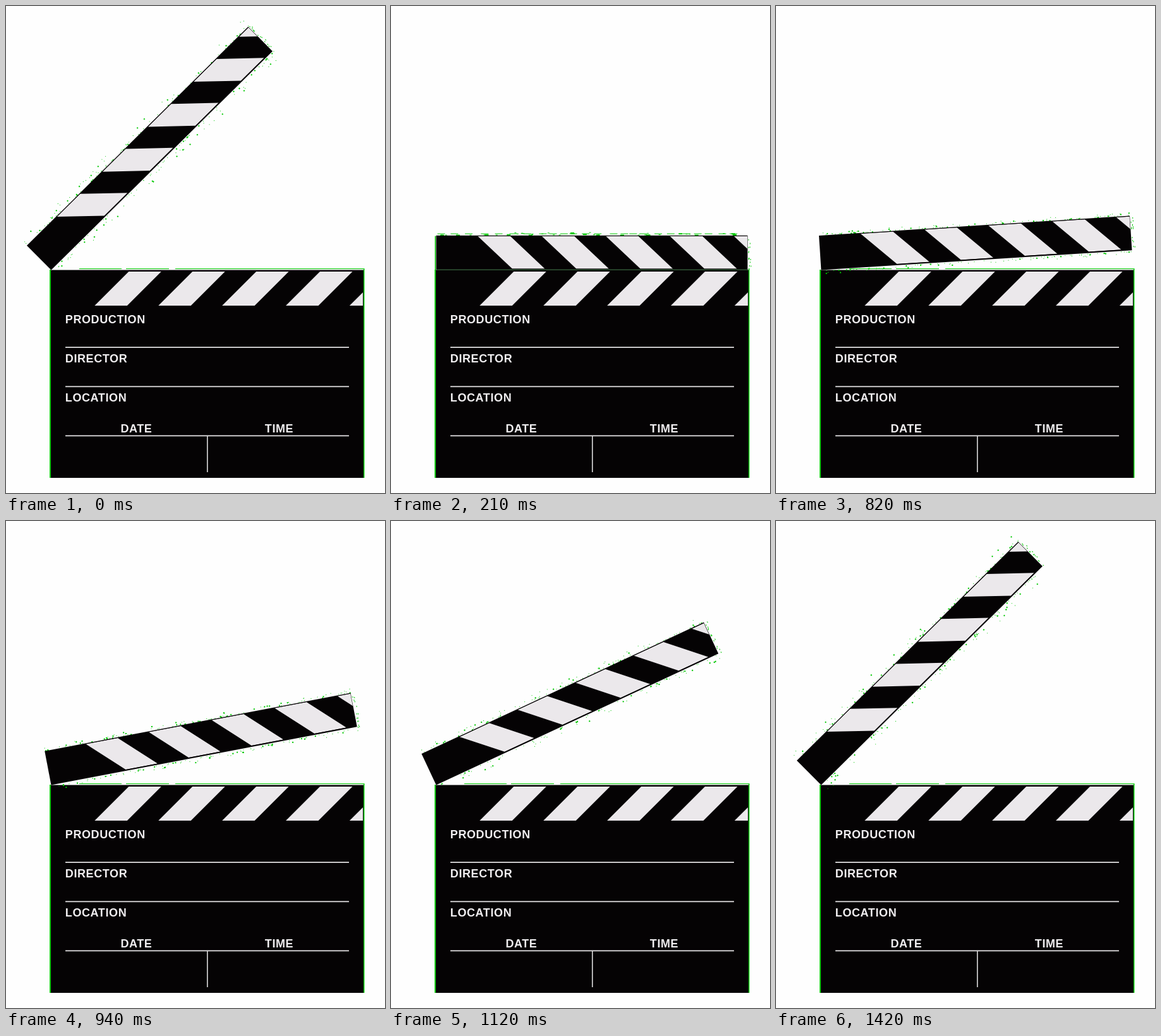
Recreate the animation shown at these times as an HTML page with a canvas. Size 600x772 px, loop 1450 ms.

```html
<!DOCTYPE html>
<html>
<head>
<meta charset="utf-8">
<title>Clapperboard</title>
<style>
  html, body { margin: 0; overflow: hidden; background: #fefefe; }
  canvas { display: block; }
</style>
</head>
<body>
<canvas id="stage" width="600" height="772"></canvas>
<script>
const ctx = document.getElementById('stage').getContext('2d');
const LOOP = 1450, STEP = 30, CLOSE = 200, OPEN_ANGLE = 44.7;
const BLACK = '#050304', PALE = '#ebe8eb', GREEN = '#00c800', LINE = '#dcdbdc';

// Opening swing: time (ms), angle (deg), speed (deg/ms)
const swing = [
  [665, 0, 0], [820, 3.65, .048], [940, 10.8, .07],
  [1120, 25, .081], [1420, OPEN_ANGLE, .04]
];

function armAngle(t) {
  if (t < CLOSE) return OPEN_ANGLE * (1 - (t / CLOSE) ** 1.6);
  if (t <= swing[0][0]) return 0;
  const i = swing.findIndex(key => key[0] >= t);
  if (i < 0) return OPEN_ANGLE;
  const [t0, a0, v0] = swing[i - 1], [t1, a1, v1] = swing[i];
  const d = t1 - t0, u = (t - t0) / d, w = 1 - u;
  return w * w * ((1 + 2 * u) * a0 + u * d * v0) + u * u * ((3 - 2 * u) * a1 - w * d * v1);
}

function randomFrom(seed) {
  return () => {
    seed = (seed * 16807) % 2147483647;
    return seed / 2147483647;
  };
}

function rect(color, x, y, w, h) {
  ctx.fillStyle = color;
  ctx.fillRect(x, y, w, h);
}

// Slanted stripes inside a bar, given the left ends of the first one
function stripes(left, right, top, bottom, topX, bottomX, pitch) {
  ctx.save();
  ctx.beginPath();
  ctx.rect(left, top, right - left, bottom - top);
  ctx.clip();
  ctx.fillStyle = PALE;
  ctx.beginPath();
  for (let i = 0; i < 5; i++) {
    const dx = i * pitch;
    ctx.moveTo(topX + dx, top);
    ctx.lineTo(topX + dx + 51.5, top);
    ctx.lineTo(bottomX + dx + 51.5, bottom);
    ctx.lineTo(bottomX + dx, bottom);
  }
  ctx.fill();
  ctx.restore();
}

function label(text, x, y) {
  ctx.fillStyle = '#f0eef0';
  ctx.fillText(text, x, y);
}

function drawBoard(closed) {
  rect(GREEN, 69, 418, 2, 330);
  rect(GREEN, 566, 416, 1.5, 332);
  if (!closed) {
    rect(GREEN, 116, 416, 67, 1);
    rect(GREEN, 190, 416, 68, 1);
    rect(GREEN, 268, 416, 299, 1);
  }
  rect(BLACK, 71, 418.5, 495, 329.5);
  stripes(72, 565, 421, 475, 194.3, 140.3, 100.9);

  for (const y of [540.2, 602.4, 680.4]) rect(LINE, 94, y, 449, 1.8);
  rect(LINE, 318, 682, 1.6, 57);

  ctx.font = 'bold 18px "Liberation Sans", Arial, sans-serif';
  ctx.letterSpacing = '0.6px';
  label('PRODUCTION', 93.8, 502.5);
  label('DIRECTOR', 93.8, 564.5);
  label('LOCATION', 93.8, 626.5);
  label('DATE', 181.4, 676);
  label('TIME', 409.8, 676);
}

function drawFringe(closed, angle, seed) {
  const random = randomFrom(seed);
  const spread = 4 + 13 * Math.sin(angle);
  const count = closed ? 45 : 190;
  ctx.fillStyle = GREEN;
  for (let i = 0; i < count; i++) {
    const above = closed || random() < .5;
    const gap = 1 + random() ** 3 * spread;
    const x = random() * 494;
    const size = random() < .3 ? 2 : 1;
    ctx.fillRect(x, above ? -55 - gap : gap, closed ? size * 3 : size, size);
  }
  for (let i = 0; i < 14; i++) {
    ctx.fillRect(494 + random() ** 2 * 4, -54 * random(), 1, 2);
  }
  if (closed) {
    ctx.fillRect(-2, -54, 1.5, 54);
    for (let x = 2; x < 490; x += 14 + random() * 12) ctx.fillRect(x, -58, 12, 1);
  }
}

function drawArm(closed, angle, seed) {
  ctx.save();
  ctx.translate(71.5, 418.6);
  ctx.rotate(-angle);
  drawFringe(closed, angle, seed);
  rect(BLACK, 0, -54.8, 493, 54.8);
  stripes(0, 492.5, -53.6, -2, 66, 120.5, 101.4);
  ctx.restore();
  if (closed) {
    rect(BLACK, 72, 417, 493, 3);
    rect('#3c6b42', 72, 417.5, 493, 1.2);
  }
}

function draw(now) {
  const t = now % LOOP;
  const base = t < 550 ? 0 : 550;
  const held = base + Math.floor((t - base) / STEP) * STEP;
  const degrees = armAngle(held), closed = degrees === 0;
  rect('#fefefe', 0, 0, 600, 772);
  drawBoard(closed);
  drawArm(closed, degrees * Math.PI / 180, closed ? 977 : 977 + held * 7919);
}

const start = performance.now();
function tick() {
  draw(performance.now() - start);
  requestAnimationFrame(tick);
}
tick();
</script>
</body>
</html>
```
